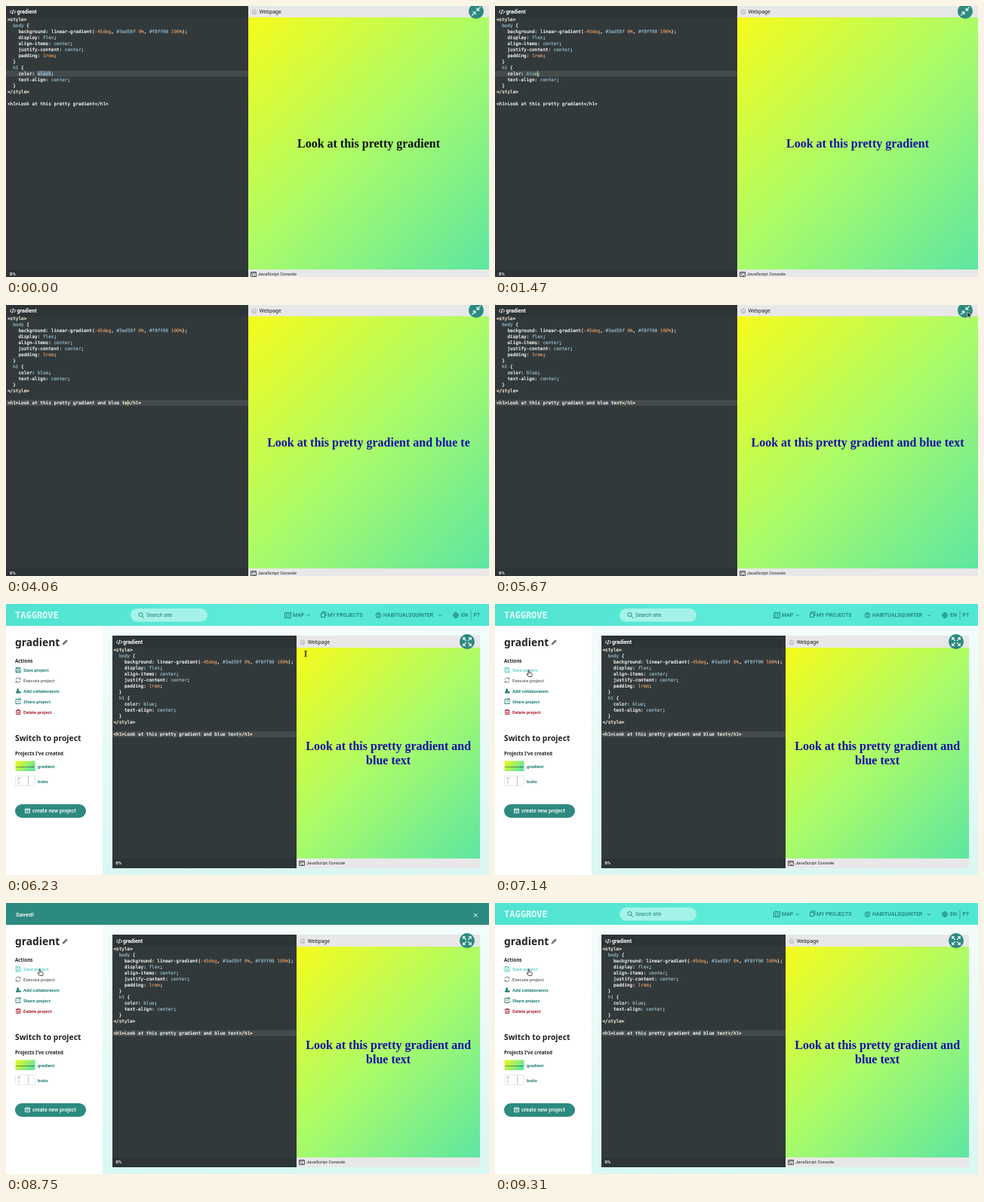
These frames come from a looping animation (640x360 px, 9.38 s). An HTML page:

```html
<!DOCTYPE html>
<html lang="en">
<head>
<meta charset="utf-8">
<title>Gradient editor</title>
<style>
  html, body { margin: 0; width: 100%; height: 100%; overflow: hidden; }
  body { position: relative; background: #fff; font-family: Roboto, sans-serif; }
  body > *, #editor div, #editor pre, #editor svg { position: absolute; }
  #page, #pointer { left: 0; top: 0; }
  #page text { dominant-baseline: central; }
  .title { font-family: "Noto Sans", sans-serif; font-weight: 600; fill: #222; }
  .nav, .link { font-weight: 500; fill: #1f7d74; }
  .nav { font-size: 7px; }
  .link { font-size: 6px; font-weight: 600; }
  .icon { fill: none; stroke: #1f7d74; stroke-width: .9; }

  #editor { left: 140.5px; top: 42px; width: 487.5px; height: 309px; }
  #editor.full { left: 0; top: -1px; width: 640px; height: 364px; }
  #editor .pane { top: 0; height: 100%; overflow: hidden; }
  #editor .bar { left: 0; right: 0; height: 16px; line-height: 18px; font-size: 7px; }
  #editor .foot { left: 0; right: 0; bottom: 0; height: 13px; line-height: 12px; font-size: 6px; }
  #editor .bar span, #editor .foot span { position: absolute; white-space: nowrap; }
  .code { left: 0; width: calc(50% + 1px); background: #32393b; color: #fff; }
  .code .bar, .code .foot { background: #2d3436; }
  .code .bar, .code .foot { font-weight: 600; }
  .code pre { margin: 0; left: 2px; top: 15px; font: 6px/8px "DejaVu Sans Mono", monospace;
    -webkit-text-stroke: .2px; }
  #active { left: 0; width: 100%; height: 8px; background: #454b4d; }
  #caret { width: .9px; height: 8px; background: #8fe34a; }
  pre i { font-style: normal; color: #8fb5c4; }
  pre u { text-decoration: none; color: #d0925c; }
  pre s { text-decoration: none; color: #fdf6e2; }
  pre mark { color: #a5c3d0; background: #5a6c7c; }
  .preview { left: calc(50% + 1px); right: 0; color: #222; }
  .preview .bar, .preview .foot { background: #e8e8e8; }
  .view { left: 0; right: 0; top: 16px; bottom: 13px; padding: 9px 8px 8px; box-sizing: border-box;
    display: flex; align-items: center; justify-content: center;
    background: linear-gradient(-45deg, #5de6a2, #aafc69 50%, #f6fb1c); }
  h1 { margin: 0; text-align: center; font: bold 16px/18.5px "Liberation Serif", serif; }
  #zoom { right: 6px; top: -3px; }
  #toast { left: 0; top: 0; width: 640px; height: 29px; background: #2d8a80; color: #fff;
    font-size: 8px; font-weight: 500; line-height: 32px; }
  #toast span { position: absolute; left: 13px; }
  #toast svg { position: absolute; left: 619px; top: 13px; }
</style>
</head>
<body>
<svg id="page" width="640" height="360">
  <defs>
    <linearGradient id="mint"><stop stop-color="#4fe3d0"/><stop offset=".5" stop-color="#5debd8"/><stop offset="1" stop-color="#4fe6d2"/></linearGradient>
    <linearGradient id="pale" x2="0" y2="1"><stop stop-color="#f3fdfb"/><stop offset="1" stop-color="#d9f7f2"/></linearGradient>
    <linearGradient id="lime" x2="1" y2=".5"><stop stop-color="#f4fb18"/><stop offset="1" stop-color="#62e69c"/></linearGradient>
  </defs>
  <rect x="128" y="29" width="512" height="331" fill="url(#pale)"/>
  <rect width="640" height="29" fill="url(#mint)"/>
  <text x="12" y="14.5" fill="#e6fffb" font-family="DejaVu Sans Mono, monospace" font-weight="bold" font-size="12">TAGGROVE</text>
  <rect x="165" y="6" width="102" height="17.5" rx="8.7" fill="#a5f3e8"/>
  <g class="icon">
    <circle cx="178.5" cy="14" r="2.6"/><path d="M180.5 16l2.5 2.8"/>
    <path d="M369.5 12l2.5-1 3 1 2.5-1v7l-2.5 1-3-1-2.5 1zM372 11v7M375 12v7"/>
    <path d="M417.5 12.5h5v5h-5zM419 12.5v-2h5v5h-1.5"/>
    <circle cx="493.5" cy="15" r="3.4"/><circle cx="493.5" cy="14" r="1.2"/><path d="M491.5 17.5q2-2 4 0"/>
    <circle cx="596" cy="15" r="3.4"/><path d="M592.6 15h6.8M596 11.6q-3 3.4 0 6.8q3-3.4 0-6.8"/>
    <path d="M398.5 14l2.2 2 2.2-2M573 14l2.2 2 2.2-2"/>
    <path d="M616 9v12" stroke-width=".6"/>
  </g>
  <g class="nav">
    <text x="186" y="14.5" font-weight="400">Search site</text>
    <text x="380" y="15">MAP</text>
    <text x="426" y="15">MY PROJECTS</text>
    <text x="500" y="15">HABITUALSQUINTER</text>
    <text x="603" y="15">EN</text>
    <text x="619.5" y="15">PT</text>
  </g>
  <g class="title">
    <text x="12" y="50" font-size="13.8">gradient</text>
    <text x="12" y="178" font-size="10.4">Switch to project</text>
    <text x="12" y="75" font-size="6.3">Actions</text>
    <text x="12" y="198" font-size="6.3">Projects I've created</text>
  </g>
  <path d="M74.5 54.5l.6-2.4 4.8-4.8 1.9 1.9-4.8 4.8z" fill="#777"/>
  <g class="link">
    <text id="save" x="23" y="87.5">Save project</text>
    <text x="23" y="101.5" style="fill:#777">Execute project</text>
    <text x="23" y="115.5">Add collaborators</text>
    <text x="23" y="129.5">Share project</text>
    <text x="23" y="143.5" style="fill:#b3202f">Delete project</text>
    <text x="42" y="215">gradient</text>
    <text x="42" y="235">butts</text>
  </g>
  <g class="icon">
    <path id="saveIcon" d="M13 84.5h5l1.2 1v5.5h-6.2zM14.5 84.5v2h3v-2M14.5 91v-2.5h3v2.5"/>
    <path stroke="#777" d="M13 100.5a3 3 0 0 1 5.5-1M19 98v2h-2M19 102a3 3 0 0 1-5.5 1M13 104.5v-2h2"/>
    <path d="M17 126.5h-4v6h6v-3M15.5 130l3.5-4M16.5 125.8h2.7v2.7"/>
    <path stroke="#b3202f" d="M13 141.5h6.5M15 141.5v-1.2h2.5v1.2M13.8 141.5v5h5v-5M15.5 143v2.5M17.2 143v2.5"/>
  </g>
  <path fill="#1f7d74" d="M13 118.5q0-3 2-3a1.5 1.7 0 1 1 1.5 0q1.5 0 1.5 3zM18 118.5v-2.5h1.6v2.5z"/>
  <rect x="12.5" y="208.5" width="26" height="13.5" fill="url(#lime)"/>
  <text x="25.5" y="215.5" font-size="2.1" text-anchor="middle" font-family="Liberation Serif, serif" font-weight="bold">Look at this pretty gradient</text>
  <rect x="12.5" y="228.5" width="26" height="13" fill="#fff" stroke="#ddd" stroke-width=".6"/>
  <path d="M15 231h5M15 232.5h3M17 234v6M29.5 229v12" stroke="#999" stroke-width=".6"/>
  <rect x="12" y="266" width="94" height="18" rx="9" fill="#2d8a80"/>
  <path d="M25.5 272h6v5.5h-6zM25.5 273.5h6M27 275.5h3" fill="none" stroke="#fff" stroke-width=".9"/>
  <text x="35" y="275" font-size="7" font-weight="500" fill="#fff">create new project</text>
</svg>

<div id="editor">
  <div class="pane code">
    <div class="bar">
      <svg width="9" height="8" style="left:5px;top:5px" fill="none" stroke="#fff"><path d="M2.3 1.5l-2 2.2 2 2.2M5.7 1.5l2 2.2-2 2.2M4.7 .8l-1.4 6"/></svg>
      <span style="left:14.5px">gradient</span>
    </div>
    <div id="active"></div>
    <pre id="source"></pre>
    <div id="caret"></div>
    <div class="foot"><span style="left:5px">0%</span></div>
  </div>
  <div class="pane preview">
    <div class="bar">
      <svg width="8" height="8" style="left:3.5px;top:5px"><circle cx="4" cy="4" r="3.4" fill="#c4c4c4"/><path d="M2 2.5l2 1-1 2M5 2l1 2" stroke="#f2f2f2" fill="none"/></svg>
      <span style="left:14.5px">Webpage</span>
    </div>
    <div class="view"><h1 id="heading"></h1></div>
    <div class="foot">
      <svg width="9" height="8" style="left:2.5px;top:3px" fill="none" stroke="#444" stroke-width=".9"><path d="M.5 .5h7v6h-7zM.5 2h7M2 3.3l1.2 1-1.2 1M4 5.3h2"/></svg>
      <span style="left:12.5px">JavaScript Console</span>
    </div>
  </div>
  <svg id="zoom" width="22" height="22" viewBox="-11 -11 22 22">
    <circle r="10" fill="#2d8a80"/>
    <path id="zoomIcon" fill="none" stroke="#fff" stroke-width="1.2"/>
  </svg>
</div>

<div id="toast"><span>Saved!</span><svg width="7" height="7" stroke="#fff"><path d="M1 1l4.5 4.5M5.5 1l-4.5 4.5"/></svg></div>

<svg id="pointer" width="640" height="360"><path id="cursor"/></svg>

<script>
const LOOP = 9380, STEP = 70, KEY_TIME = 112;
const CHAR = 3.612, LINE = 8, CODE_LEFT = 2, CODE_TOP = 15;
const COLOR_START = 700, TEXT_START = 2660, CLICK_TEXT = 2100;
const SHRINK = 5810, HOVER = 6650, TOAST_IN = 7210, TOAST_OUT = 9030, SLIDE = 210;
const BASE = "Look at this pretty gradient", ADDED = " and blue text";

const CURSORS = {
  beam: { fill: "none", stroke: "#111", "stroke-width": .9,
    d: "M-1.7-3.7q1.7 0 1.7 1v5.4q0 1-1.7 1M1.7-3.7q-1.7 0-1.7 1v5.4q0 1 1.7 1" },
  arrow: { fill: "#222", stroke: "#fff", "stroke-width": .6,
    d: "M0 0v8l1.9-1.7 1.2 2.8 1.3-.6-1.2-2.7h2.5z" },
  hand: { fill: "#fff", stroke: "#222", "stroke-width": .8,
    d: "M-1-4q1-.8 1.3.3v3l3 .7q1.2.4.9 1.7l-.7 2.8h-4l-2.5-3q-.2-1 .9-.7l1.1.9z" }
};
const EXPAND = "M-1.2-1.2l-4-4M1.2-1.2l4-4M-1.2 1.2l-4 4M1.2 1.2l4 4" +
  "M-5.2-2.2v-3h3M2.2-5.2h3v3M-5.2 2.2v3h3M2.2 5.2h3v-3";
const COMPRESS = "M1.2-1.2l4.5-4.5M-1.2 1.2l-4.5 4.5M1.2-4.5v3.3h3.3M-1.2 4.5v-3.3h-3.3";

// Pointer trips: [start, end, from, to, cursor]
const TRIPS = [
  [1500, 2050, [62, 92], [120, 131], "beam"],
  [2050, 2770, [120, 131], [120, 131], "beam"],
  [4700, 5000, [120, 131], [330, 80], "beam"],
  [5000, 5450, [330, 80], [626, 9], "arrow"],
  [5450, 5870, [626, 9], [626, 9], "arrow"],
  [5870, 6230, [626, 9], [397, 66], "arrow"],
  [6230, 6440, [397, 66], [141, 86], "beam"],
  [6440, HOVER, [141, 86], [45, 92], "arrow"],
  [HOVER, LOOP, [45, 92], [45, 92], "hand"]
];

const $ = id => document.getElementById(id);
const clamp = (v, lo = 0, hi = 1) => Math.min(hi, Math.max(lo, v));
const typed = (t, start, text) => text.slice(0, clamp(Math.floor((t - start) / KEY_TIME), 0, text.length));
const tag = name => `<s>&lt;${name}&gt;</s>`;
const setAttributes = (node, attributes) =>
  Object.entries(attributes).forEach(([name, value]) => node.setAttribute(name, value));

function sourceCode(color, text) {
  const rule = (name, value) => `    ${name}: ${value};`;
  const center = "<i>center</i>";
  return [
    tag("style"),
    "  <i>body</i> {",
    rule("background", "linear-gradient(<u>-45deg</u>, <i>#3ad59f</i> <u>0%</u>, <i>#f8ff00</i> <u>100%</u>)"),
    rule("display", "<i>flex</i>"),
    rule("align-items", center),
    rule("justify-content", center),
    rule("padding", "<u>1rem</u>"),
    "  }",
    "  <i>h1</i> {",
    rule("color", color),
    rule("text-align", center),
    "  }",
    tag("/style"),
    "",
    tag("h1") + text + tag("/h1")
  ].join("\n");
}

function drawCaret(t, color, text) {
  const onText = t >= CLICK_TEXT;
  const typingEnd = TEXT_START + KEY_TIME * ADDED.length;
  const idle = onText ? t - typingEnd : t - COLOR_START - KEY_TIME * 4;
  const column = onText ? 4 + text.length : 11 + color.length;
  const row = onText ? 14 : 9;
  const blurred = t >= 5600;
  const shown = t >= COLOR_START + KEY_TIME && (blurred || idle < 0 || idle % 1000 < 500);
  const top = CODE_TOP + row * LINE;
  $("caret").style.cssText =
    `left:${CODE_LEFT + column * CHAR}px;top:${top}px;opacity:${shown ? (blurred ? .3 : 1) : 0}`;
  $("active").style.top = top + "px";
}

function drawPointer(t) {
  const trip = TRIPS.find(([start, end]) => t >= start && t < end);
  $("pointer").style.display = trip ? "" : "none";
  if (!trip) return;
  const [start, end, from, to, cursor] = trip;
  const p = (t - start) / (end - start);
  const [x, y] = from.map((v, i) => v + (to[i] - v) * p);
  setAttributes($("cursor"), { ...CURSORS[cursor], transform: `translate(${x} ${y})` });
}

function draw(t) {
  const full = t < SHRINK;
  const color = typed(t, COLOR_START, "blue");
  const text = BASE + typed(t, TEXT_START, ADDED);
  $("source").innerHTML = sourceCode(color ? `<i>${color}</i>` : "<mark>black</mark>", text);
  $("heading").textContent = text;
  $("heading").style.color = color === "blue" ? "#1511a6" : "#0c1006";
  $("editor").className = full ? "full" : "";
  $("page").style.display = full ? "none" : "";
  $("zoomIcon").setAttribute("d", full ? COMPRESS : EXPAND);
  drawCaret(t, color, text);

  const linkColor = t >= HOVER ? "#63d3c8" : "#1f7d74";
  $("save").style.fill = $("saveIcon").style.stroke = linkColor;
  const drop = clamp((t - TOAST_IN) / SLIDE) - clamp((t - TOAST_OUT) / SLIDE);
  $("toast").style.transform = `translateY(${-30 * (1 - drop)}px)`;
  drawPointer(t);
}

const origin = performance.now();
function tick() {
  const t = (performance.now() - origin) % LOOP;
  draw(Math.floor(t / STEP) * STEP);
  requestAnimationFrame(tick);
}
tick();
</script>
</body>
</html>
```
